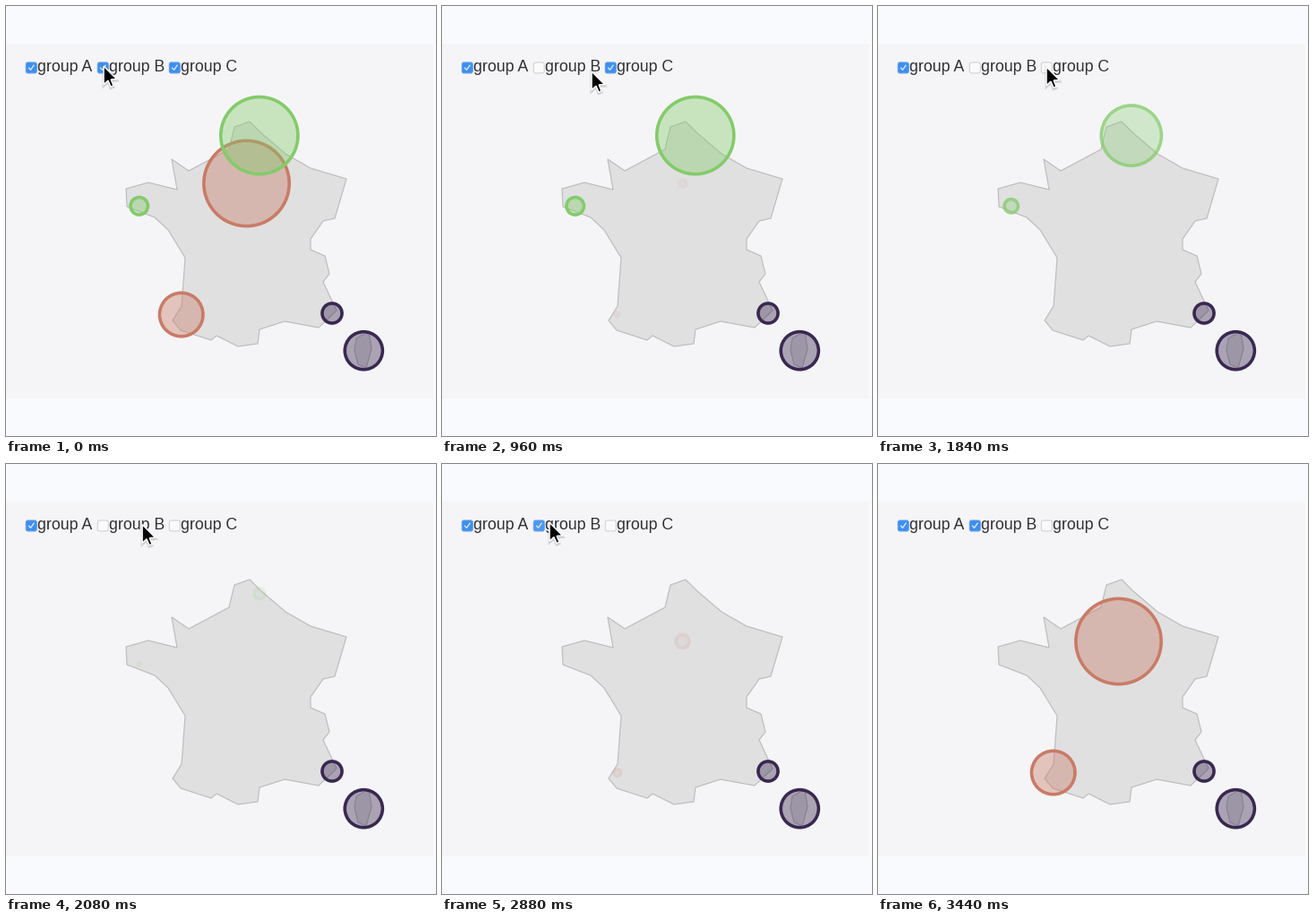
A matplotlib script for the animation above (3.84 s loop, 480 by 480 pixels).

```python
import numpy as np
import matplotlib.pyplot as plt
from matplotlib.animation import FuncAnimation
from matplotlib.patches import Circle, FancyBboxPatch, Polygon, Rectangle

SIZE, DPI = 480, 100
STEP, FRAMES = 80, 48
PX = 72 / DPI  # one pixel in points
RESIZE_MS, CHECK_MS = 820, 300
RING = 3.7

# group: (colour, circles as x, y, radius)
GROUPS = {
    "A": ("#392850", [(399.3, 384.7, 21), (364, 343, 11)]),
    "B": ("#c97b66", [(268.5, 198, 47.6), (195.7, 344.5, 24.2)]),
    "C": ("#83cb6a", [(282.8, 144.6, 43), (148.7, 223.3, 9.7)]),
}
# group: clicks as time, change of visibility
CLICKS = {"A": [], "B": [(367, -1), (2602, 1)], "C": [(1528, -1)]}

ON_B, ON_C = (109, 67), (188, 68)
STOPS = [(640, ON_B), (960, (167, 73)), (1120, ON_C), (1880, ON_C),
         (2320, ON_B), (2760, ON_B), (3120, (142, 62)), (3280, (152, 54))]
CURSOR_HIDES = 3360

MAINLAND = [
    (272, 129), (255, 135), (249, 160), (204, 184), (185, 171), (191, 205),
    (159, 197), (134, 204), (135, 224), (166, 236), (181, 250), (200, 281),
    (196, 335), (186, 351), (195, 362), (229, 373), (235, 368), (259, 380),
    (281, 377), (283, 361), (311, 352), (349, 359), (369, 340), (354, 308),
    (361, 299), (356, 279), (340, 272), (340, 260), (354, 240), (367, 237),
    (380, 193), (340, 181), (312, 165), (284, 141),
]
ISLAND = [(405, 363), (408, 383), (402, 404), (393, 400), (389, 384), (391, 371)]
ARROW = 1.22 * np.array([(0, 0), (0, 17), (4, 13.3), (6.5, 19),
                         (9, 18), (6.7, 12.3), (12, 12)])

fig = plt.figure(figsize=(SIZE / DPI, SIZE / DPI), dpi=DPI, facecolor="#f8fafd")
ax = fig.add_axes([0, 0, 1, 1])
ax.set(xlim=(0, SIZE), ylim=(SIZE, 0))
ax.axis("off")


def linear(u):
    return np.clip(u, 0, 1)


def cubic_in_out(u):
    u = np.clip(u, 0, 1)
    return 4 * u**3 if u < 0.5 else 1 - 4 * (1 - u)**3


def visibility(group, t, ease, duration):
    return 1 + sum(change * ease((t - start) / duration)
                   for start, change in CLICKS[group])


class Bubble:
    def __init__(self, group, color, x, y, radius):
        self.group, self.radius = group, radius
        self.fill = ax.add_patch(Circle((x, y), fc=color, ec="none", zorder=3))
        self.ring = ax.add_patch(Circle((x, y), fc="none", ec=color,
                                        lw=RING * PX, zorder=3))

    def update(self, t):
        shown = visibility(self.group, t, cubic_in_out, RESIZE_MS)
        radius = self.radius * shown
        self.fill.set(radius=max(radius - RING / 2, 0), alpha=0.4 * shown)
        self.ring.set(radius=radius, alpha=shown, visible=shown > 0.001)


class Checkbox:
    def __init__(self, group, x):
        self.group = group

        def box(**style):
            return ax.add_patch(FancyBboxPatch(
                (x + 2.5, 65.2), 7.5, 7.5, lw=PX, zorder=4,
                boxstyle="round,pad=2.2,rounding_size=2.2", **style))

        box(fc="#fafafb", ec="#cfcfd2")
        tick, = ax.plot([x + 3.6, x + 5.5, x + 9], [69.2, 71.3, 66.3],
                        color="#d8e8fb", lw=1.4 * PX, zorder=5)
        self.marks = [box(fc="#3c8ff0", ec="#5c9fee"), tick]
        ax.text(x + 12.8, 72.6, f"group {group}", family="Liberation Sans",
                size=17.7 * PX, color="#303032", va="baseline", zorder=4)

    def update(self, t):
        shown = visibility(self.group, t, linear, CHECK_MS)
        for mark in self.marks:
            mark.set_alpha(shown)


class Cursor:
    def __init__(self):
        self.shadow = ax.add_patch(Polygon(ARROW, fc="black", ec="black", alpha=0.13,
                                           lw=3 * PX, zorder=6))
        self.arrow = ax.add_patch(Polygon(ARROW, fc="black", ec="white",
                                          lw=1.5 * PX, zorder=7))
        self.times = [time for time, _ in STOPS]
        self.points = np.array([point for _, point in STOPS])

    def update(self, t):
        tip = [np.interp(t, self.times, values) for values in self.points.T]
        for patch, drop in ((self.arrow, 0), (self.shadow, 1.5)):
            patch.set(xy=ARROW + tip + [0, drop], visible=t < CURSOR_HIDES)


ax.add_patch(Rectangle((0, 42), 477, 395.5, fc="#f5f5f8", ec="none", zorder=0))
for outline in (MAINLAND, ISLAND):
    ax.add_patch(Polygon(outline, fc="#e0e0e1", ec="#bdbdbe", lw=1.2 * PX,
                         joinstyle="round", zorder=2))

parts = [Cursor()]
for column, (group, (color, circles)) in enumerate(GROUPS.items()):
    parts.append(Checkbox(group, 22 + 80 * column))
    parts += [Bubble(group, color, *circle) for circle in circles]


def update(frame):
    for part in parts:
        part.update(frame * STEP)
    return []


animation = FuncAnimation(fig, update, frames=FRAMES, interval=STEP,
                          repeat=True, repeat_delay=0)
plt.show()
```
